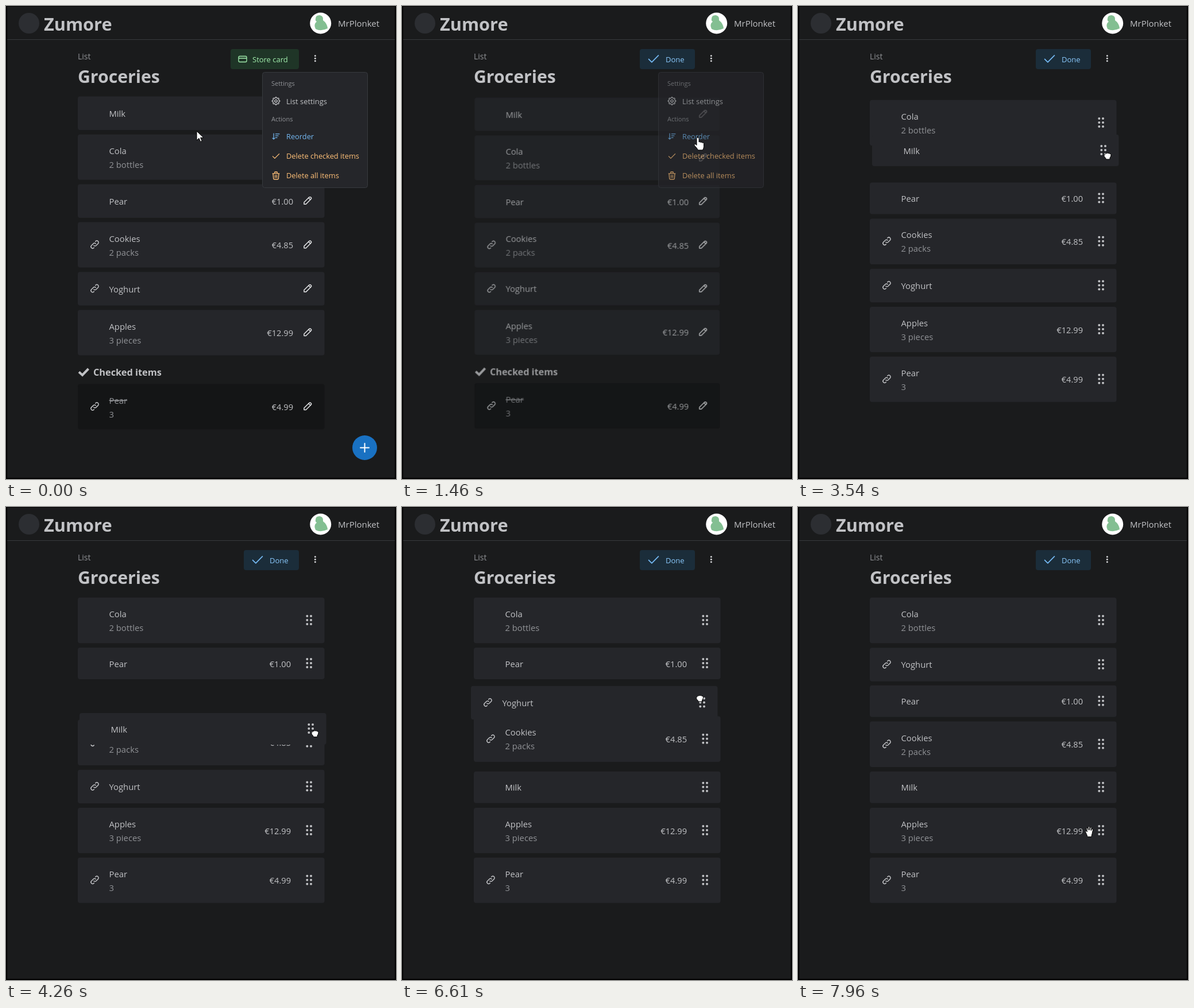
Recreate the animation shown at these times as an HTML page. Size 679x824 px, loop 8 s.

```html
<!DOCTYPE html>
<html lang="en">
<head>
<meta charset="utf-8">
<title>Grocery list reordering</title>
<style>
  html, body { margin: 0; width: 100%; height: 100%; overflow: hidden; background: #000; }
  svg { display: block; width: 679px; height: 824px; font-family: "Open Sans", "Noto Sans", sans-serif; }
  text { white-space: pre; }
</style>
</head>
<body>
<svg id="stage" viewBox="0 0 679 824"></svg>
<script>
const LOOP = 8000, STEP = 90;
const TEXT = '#c1c2c5', DIM = '#909296', CARD = '#25262a', LINE = '#373a3e';
const BLUE = '#74b8f2', ORANGE = '#ffc078', GREEN = '#a3efae';

// Bursts of activity [start, end]; the picture rests between them.
const BURSTS = [[90, 810], [900, 900], [1460, 1820], [2090, 2540], [2810, 2810],
  [3180, 3900], [3990, 4530], [4800, 5520], [5610, 5790], [6160, 6880],
  [6970, 6970], [7240, 7960]];

const ITEMS = [
  { id: 'milk', title: 'Milk', h: 55 },
  { id: 'cola', title: 'Cola', sub: '2 bottles', h: 79.5 },
  { id: 'pear', title: 'Pear', price: '€1.00', h: 55 },
  { id: 'cookies', title: 'Cookies', sub: '2 packs', price: '€4.85', link: true, h: 79.5 },
  { id: 'yoghurt', title: 'Yoghurt', link: true, h: 58.5 },
  { id: 'apples', title: 'Apples', sub: '3 pieces', price: '€12.99', h: 79 },
  { id: 'pear2', title: 'Pear', sub: '3', price: '€4.99', link: true, h: 79, checked: true }
];

const ICONS = {
  link: 'M10 14a3.5 3.5 0 0 0 5 0l4-4a3.5 3.5 0 0 0-5-5l-.5.5M14 10a3.5 3.5 0 0 0-5 0l-4 4a3.5 3.5 0 0 0 5 5l.5-.5',
  pencil: 'M4 20h4L18.5 9.5a2.8 2.8 0 0 0-4-4L4 16zM13.5 6.5l4 4',
  sort: 'M6 4v15M3 16l3 3 3-3M11 5h10M11 10h7M11 15h4',
  check: 'M4 12.5l5 5L20 6.5',
  trash: 'M4 7h16M10 11v6M14 11v6M5 7l1 12a2 2 0 0 0 2 2h8a2 2 0 0 0 2-2l1-12M9 7V4a1 1 0 0 1 1-1h4a1 1 0 0 1 1 1v3',
  gear: gearPath()
};

const CURSORS = {
  arrow: 'M0 0v16l4-3.6 2.6 6 2.6-1.1-2.6-5.9h5.4z',
  point: 'M-2 1.5a2 2 0 0 1 4 0V7.5q2-1 3 .5 2-.8 2.8.7 2.2-.6 2.7 1.3V15q0 3-2 6.5H.5Q-2 17-5.5 14q-1.5-2.5.5-3 1.5 0 3 2z',
  move: 'M0-10l4 4h-3v5h5v-3l4 4-4 4v-3h-5v5h3l-4 4-4-4h3v-5h-5v3l-4-4 4-4v3h5v-5h-3z',
  fist: 'M-4.5-2.5q1-3 2.8-1.5 1.2-2 2.6-.3 1.6-1.2 2.4.6 2.6-.6 2.7 1.7 0 3.5-2 5.5v2.5h-6.5q-1-3-3.2-4.5-1.5-3 1.2-4z',
  open: 'M-6.5 0q-.5-2 1.5-2l1.5 2-1.5-6q.5-2 2.3-.8l1 3.8v-5.5q1.3-1.6 2.5 0v5.5l1-4.8q1.6-1 2.3.6l-.8 5 1.2-2.8q2-1 2.2.8L5 3.5Q4 6 4 8.5h-7q-.8-3.5-3.5-8.5z'
};

function gearPath() {
  const points = Array.from({ length: 96 }, (_, i) => {
    const a = i * Math.PI / 48, r = 8.2 + 1.2 * Math.cos(8 * a);
    return (12 + r * Math.cos(a)).toFixed(1) + ' ' + (12 + r * Math.sin(a)).toFixed(1);
  });
  return `M${points.join('L')}zM15 12a3 3 0 1 1-6 0a3 3 0 1 1 6 0`;
}

const label = (x, y, str, size = 14.8, fill = TEXT, extra = '') =>
  `<text x="${x}" y="${y}" font-size="${size}" fill="${fill}" ${extra}>${str}</text>`;
const icon = (name, x, y, scale, color, width = 1.9) =>
  `<path d="${ICONS[name]}" transform="translate(${x} ${y}) scale(${scale}) translate(-12 -12)"
    fill="none" stroke="${color}" stroke-width="${width}" stroke-linecap="round" stroke-linejoin="round"/>`;
const box = (x, y, w, h, fill, extra = '') =>
  `<rect x="${x}" y="${y}" width="${w}" height="${h}" rx="4" fill="${fill}" ${extra}/>`;
const dot = (x, y, r, fill) => `<circle cx="${x}" cy="${y}" r="${r}" fill="${fill}"/>`;
const grip = y => [-7, 0, 7].map(d => dot(524.3, y + d, 2, TEXT) + dot(531, y + d, 2, TEXT)).join('');

function row(item, h, reorder) {
  const mid = h / 2, struck = item.checked && !reorder;
  return box(125, 0, 429.5, h, struck ? '#141516' : CARD) +
    (item.link ? icon('link', 154.5, mid - .5, .82, TEXT, 1.8) : '') +
    label(179.5, item.sub ? 34 : mid + 6, item.title, 14.8, struck ? DIM : TEXT,
      struck ? 'text-decoration="line-through"' : '') +
    (item.sub ? label(179.5, 58, item.sub, 14.8, DIM) : '') +
    (item.price ? label(reorder ? 496 : 500, mid + 6, item.price, 14.6, TEXT, 'text-anchor="end"') : '') +
    (reorder ? grip(mid - .5) : icon('pencil', 525.5, mid - 1, .82, '#e4e5e7', 1.8));
}

function editList() {
  let y = 157.5;
  return ITEMS.map(item => {
    const h = item.sub ? 79 : 58.5, top = item.checked ? 658.5 : y;
    y += h + 7.7;
    return `<g transform="translate(0 ${top})">${row(item, h, false)}</g>`;
  }).join('') +
    `<path d="M127 637.5l6 5.5 10.5-11" fill="none" stroke="${TEXT}" stroke-width="4"/>` +
    label(152, 644, 'Checked items', 16.3, TEXT, 'font-weight="700"');
}

function reorderList() {
  let y = 157.5;
  return ITEMS.map(item => {
    item.top = y;
    y += item.h + 7.8;
    return `<g id="${item.id}">${row(item, item.h, true)}</g>`;
  }).join('');
}

const menu = () =>
  box(446.5, 115.5, 183, 201, CARD, `stroke="${LINE}"`) +
  box(451, 211, 174, 34, 'rgba(25,113,194,.2)', 'id="hover"') +
  label(462, 139, 'Settings', 11, DIM) +
  icon('gear', 470, 165.5, .72, TEXT) + label(488, 171, 'List settings', 12.9) +
  label(462, 201, 'Actions', 11, DIM) +
  icon('sort', 470, 227.5, .66, BLUE) + label(488, 232, 'Reorder', 12.8, BLUE) +
  icon('check', 470, 261.5, .7, ORANGE) + label(488, 266, 'Delete checked items', 12.8, ORANGE) +
  icon('trash', 470, 295.5, .72, ORANGE) + label(488, 300, 'Delete all items', 12.8, ORANGE);

const header = () =>
  dot(40, 30, 18, '#2c2e32') +
  label(66, 43, 'Zumore', 30.7, TEXT, 'font-weight="700"') +
  dot(547.7, 30, 18.5, '#fff') +
  '<path d="M539 22q0-6 7-6 7 1 6 9 7 5 8 14-12 6-21 1-4-8 2-13-3-1-2-5z" fill="#83bf92"/>' +
  label(578, 36, 'MrPlonket', 15) +
  `<path d="M2 58.5H677" stroke="${LINE}"/>` +
  label(125, 93, 'List', 14, DIM) +
  label(125, 134, 'Groceries', 30.2, TEXT, 'font-weight="700"') +
  [86.7, 91.2, 95.7].map(y => dot(538.3, y, 1.5, '#d6d7d9')).join('');

const storeButton = () =>
  box(391, 75, 119, 35, '#1f3527') +
  `<path d="M407 87.5h10a2 2 0 0 1 2 2v6a2 2 0 0 1-2 2h-10a2 2 0 0 1-2-2v-6a2 2 0 0 1 2-2zM405 91h14"
    fill="none" stroke="${GREEN}" stroke-width="1.3"/>` +
  label(429, 98, 'Store card', 13, GREEN, 'font-weight="500"');

const doneButton = () =>
  box(414, 75, 96, 35, '#1b2d3a') + icon('check', 438, 92, 1.05, BLUE, 1.7) +
  label(459, 98, 'Done', 13, '#8ac8fb', 'font-weight="500"');

const addButton = () => dot(624.5, 769.5, 21.5, '#1971c2') +
  '<path d="M617 769.5h15M624.5 762v15" stroke="#fff" stroke-width="2" stroke-linecap="round"/>';

const group = (id, content) => `<g id="${id}">${content}</g>`;
document.getElementById('stage').innerHTML =
  '<rect x="2" y="1" width="675" height="821" fill="#1a1b1c"/>' + header() +
  group('edit', editList()) + group('reorder', reorderList()) +
  group('store', storeButton() + addButton()) + group('done', doneButton()) +
  group('menu', menu()) +
  '<path id="cursor" fill="#fff" stroke="#000" stroke-width="1" stroke-linejoin="round"/>';

const el = id => document.getElementById(id);
const show = (id, opacity) => {
  el(id).setAttribute('opacity', opacity);
  el(id).setAttribute('display', opacity > 0 ? 'inline' : 'none');
};

// Keys are [time, value, value...]; returns values interpolated at t.
function track(keys, t) {
  const next = keys.findIndex(k => k[0] > t);
  if (next < 0) return keys[keys.length - 1].slice(1);
  if (next === 0) return keys[0].slice(1);
  const a = keys[next - 1], b = keys[next], p = (t - a[0]) / (b[0] - a[0]);
  return a.slice(1).map((v, i) => v + (b[i + 1] - v) * p);
}

const slide = (t, start, distance) => {
  const p = Math.min(1, Math.max(0, (t - start) / 220));
  return distance * (1 - (1 - p) ** 3);
};

const POINTER = [[0, 332, 218], [540, 480, 244], [810, 515, 230], [2000, 515, 229],
  [2540, 536, 188], [3090, 536, 188], [3540, 539, 261], [4260, 538, 394.5], [4450, 535, 425],
  [4710, 535, 425], [5520, 526, 475], [5790, 523, 484], [6070, 523, 484], [6610, 518.5, 333],
  [6800, 519, 269], [7150, 519, 269], [7960, 507, 566]];
const SHAPES = [[0, 'arrow'], [900, 'point'], [1550, 'arrow'], [2360, 'move'], [2810, 'fist'],
  [4530, 'move'], [6160, 'fist'], [6880, 'move'], [7780, 'open']];
const MILK_DRAG = [[3090, 0, 0], [3540, 4, 66.5], [4260, 3, 201.5], [4450, 0, 237.5]];
const YOGHURT_DRAG = [[6070, 0, 0], [6610, -5, -146], [6820, 0, -212.5]];

function settle(t) {
  const burst = BURSTS.filter(b => b[0] <= t).pop();
  if (!burst) return 0;
  return burst[0] + Math.floor((Math.min(t, burst[1]) - burst[0]) / STEP) * STEP;
}

let topmost = '';
function raise(id) {
  if (topmost === id) return;
  topmost = id;
  el('reorder').append(el(id));
}

function render(time) {
  const t = settle(time), editing = t < 1460;
  show('store', editing ? 1 : 0);
  show('done', editing ? 0 : 1);
  show('menu', track([[1370, 1], [1460, .68], [1570, 0]], t)[0]);
  show('hover', t >= 630 && editing ? 1 : 0);

  const [fade, scale] = track([[1370, 1, 1], [1460, .78, .994], [1600, 0, .985]], t);
  show('edit', fade);
  el('edit').setAttribute('transform', `translate(340 480) scale(${scale}) translate(-340 -480)`);
  const [appear, grow] = track([[1570, 0, .985], [1820, 1, 1]], t);
  show('reorder', appear);
  el('reorder').setAttribute('transform', `translate(340 440) scale(${grow}) translate(-340 -440)`);

  const milk = track(MILK_DRAG, t), yoghurt = track(YOGHURT_DRAG, t);
  const up = -62.5, down = 65.7;
  const shift = {
    milk: [milk[0], milk[1] + slide(t, 6200, down)],
    cola: [0, slide(t, 3420, up)],
    pear: [0, slide(t, 3838, up) + slide(t, 6720, down)],
    cookies: [0, slide(t, 4260, up) + slide(t, 6504, down)],
    yoghurt
  };
  for (const item of ITEMS) {
    const [dx, dy] = shift[item.id] || [0, 0];
    el(item.id).setAttribute('transform', `translate(${dx} ${item.top + dy})`);
  }
  raise(t < 6000 ? 'milk' : 'yoghurt');

  const [x, y] = track(POINTER, t);
  el('cursor').setAttribute('d', CURSORS[SHAPES.filter(s => s[0] <= t).pop()[1]]);
  el('cursor').setAttribute('transform', `translate(${x} ${y})`);
}

const start = performance.now();
function tick() {
  render((performance.now() - start) % LOOP);
  requestAnimationFrame(tick);
}
tick();
</script>
</body>
</html>
```
